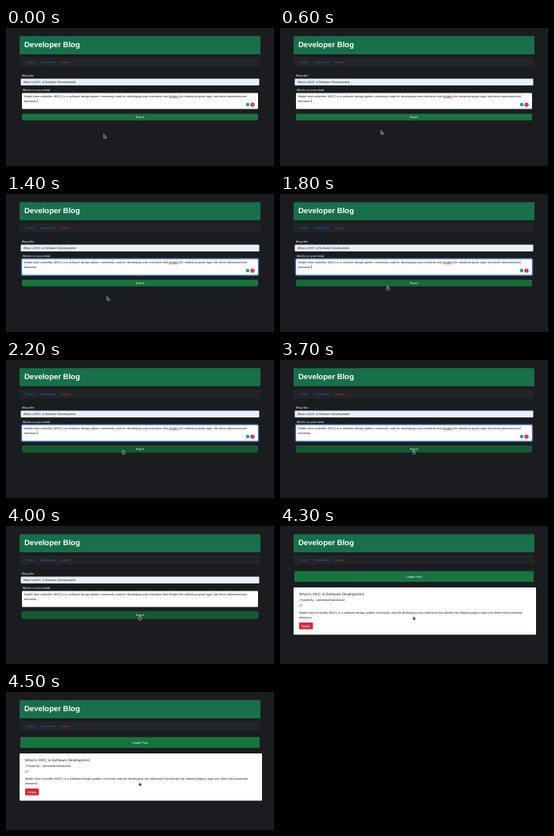
Recreate the animation shown at these times as an HTML page. Size 336x173 px, loop 5 s.

```html
<!DOCTYPE html>
<html lang="en">
<head>
<meta charset="utf-8">
<title>Developer Blog</title>
<style>
  html, body { margin: 0; width: 100%; height: 100%; overflow: hidden; background: #1b1c20; }
  svg { display: block; width: 100vw; height: 100vh; }
  text { font: 3.79px "Liberation Sans", Arial, sans-serif; text-rendering: geometricPrecision; }
  .head { font-size: 9.5px; font-weight: bold; }
  .title { font-size: 4.7px; }
  .light { fill: #fff; }
  .dark { fill: #212529; }
  .link { fill: #1763dc; }
  .danger { fill: #c52f3b; }
  .mid { text-anchor: middle; }

  .form, .post, .caret, .ring, .press, .checker, .hover, .pointer, .arrow, .hand {
    animation: 5s linear infinite;
  }
  .form, .post, .caret, .checker, .arrow, .hand { animation-timing-function: step-end; }

  .form { animation-name: form; }
  .post { animation-name: post; }
  .caret { animation-name: caret; }
  .ring { animation-name: ring; }
  .press { animation-name: press; }
  .checker { animation-name: checker; }
  .hover { animation-name: hover; }
  .pointer { animation-name: move; }
  .arrow { animation-name: arrow; }
  .hand { animation-name: hand; }

  @keyframes form { 0% { opacity: 1 } 86%, 100% { opacity: 0 } }
  @keyframes post { 0% { opacity: 0 } 86%, 100% { opacity: 1 } }
  @keyframes caret {
    0%, 12%, 34%, 58% { opacity: 1 }
    2%, 22%, 46%, 70%, 100% { opacity: 0 }
  }
  @keyframes ring { 0%, 13% { opacity: 0 } 16%, 74% { opacity: 1 } 77%, 100% { opacity: 0 } }
  @keyframes press { 0%, 74% { opacity: 0 } 77%, 100% { opacity: 1 } }
  @keyframes checker { 0% { opacity: 1 } 76%, 100% { opacity: 0 } }
  @keyframes hover { 0%, 35% { opacity: 0 } 38%, 100% { opacity: 1 } }
  @keyframes arrow { 0% { opacity: 1 } 36%, 100% { opacity: 0 } }
  @keyframes hand { 0% { opacity: 0 } 36%, 100% { opacity: 1 } }
  @keyframes move {
    0%, 2% { transform: translate(124px, 136px); animation-timing-function: ease-in-out }
    10%, 29% { transform: translate(128px, 131px); animation-timing-function: ease-in }
    33% { transform: translate(130px, 122px) }
    37% { transform: translate(137px, 116.5px); animation-timing-function: ease-out }
    43%, 46% { transform: translate(147.5px, 115.5px); animation-timing-function: ease-in-out }
    54%, 100% { transform: translate(168px, 115.3px) }
  }
</style>
</head>
<body>
<svg viewBox="0 0 336 173" preserveAspectRatio="none">
  <rect width="336" height="173" fill="#1b1c20"/>
  <rect x="17" y="10.3" width="302" height="22.7" rx="1.5" fill="#17704a"/>
  <text class="head light" x="23" y="24">Developer Blog</text>
  <rect x="17" y="37" width="302" height="11" rx=".8" fill="#222427"/>
  <text class="link" x="25" y="44">Home</text>
  <text class="link" x="43.3" y="44">Dashboard</text>
  <text class="danger" x="69" y="44">Logout</text>

  <g class="form">
    <text class="light" x="20" y="60.6">Blog title:</text>
    <rect x="18.5" y="63.5" width="299" height="8.5" rx="1" fill="#e8f0fe"/>
    <text class="dark" x="21.7" y="69">What is MVC in Software Development</text>
    <text class="light" x="20.8" y="78.6">What's on your mind</text>

    <rect class="ring" x="19.3" y="80.8" width="297.4" height="21.4" rx="1.5" fill="none" stroke="#2b62ad" stroke-width="1.3"/>
    <rect x="20" y="81.5" width="296" height="20" rx="1" fill="#fff"/>
    <rect class="ring" x="20.1" y="81.6" width="295.8" height="19.8" rx="1" fill="none" stroke="#86b7fe" stroke-width=".4"/>
    <text class="dark" x="22.5" y="87">Model-view-controller (MVC) is a software design pattern commonly used for developing user interfaces that divides the related program logic into three interconnected</text>
    <text class="dark" x="22.5" y="93">elements.</text>
    <rect class="caret" x="39" y="89.3" width=".5" height="4.2" fill="#212529"/>
    <g class="checker">
      <rect x="204.6" y="87.5" width="11.8" height=".6" fill="#e0384a"/>
      <circle cx="303" cy="96" r="2.2" fill="#16a575"/>
      <circle cx="309" cy="96" r="2.6" fill="#d9203a"/>
      <text class="light mid" x="309" y="97.3">1</text>
    </g>

    <rect class="press" x="19.3" y="106.8" width="297.4" height="9.6" rx="1.4" fill="#24503a"/>
    <rect x="20" y="107.4" width="296" height="8.3" rx="1" fill="#17743f"/>
    <rect class="hover" x="20" y="107.4" width="296" height="8.3" rx="1" fill="#145a31"/>
    <text class="light mid" x="168" y="112.9">Post it</text>
  </g>

  <g class="post">
    <rect x="18" y="56.5" width="300" height="13.5" rx="1" fill="#17743f"/>
    <text class="light mid" x="168" y="64.6">Create Post</text>
    <rect x="17" y="77" width="304" height="59.3" rx="1" fill="#fff"/>
    <text class="title dark" x="24" y="87">What is MVC in Software Development</text>
    <text class="dark" x="25.3" y="93.7">Posted By : wemtolud fardokinvel</text>
    <text class="dark" x="24" y="100.6">27</text>
    <text class="dark" x="24" y="109.7">Model-view-controller (MVC) is a software design pattern commonly used for developing user interfaces that divides the related program logic into three interconnected</text>
    <text class="dark" x="24" y="115.6">elements.</text>
    <rect x="24" y="121" width="17.3" height="8.6" rx="1" fill="#d9263a"/>
    <text class="light mid" x="32.6" y="126.7">Delete</text>
  </g>

  <g class="pointer" stroke="#fff" stroke-width=".5" stroke-linejoin="round">
    <path class="arrow" d="M-1.4-2.7V1.9L-.4 1 .4 2.8 1.2 2.4.5.7H1.9Z" fill="#111"/>
    <path class="hand" d="M-.9-2.3Q-.4-2.9 0-2.3V-.7L1.7-.2Q2.1 0 2 .6L1.4 2.5H-.8L-2.1.6Q-2.1-.1-1.4 0L-.9.4Z" fill="#222"/>
  </g>
</svg>
</body>
</html>
```
